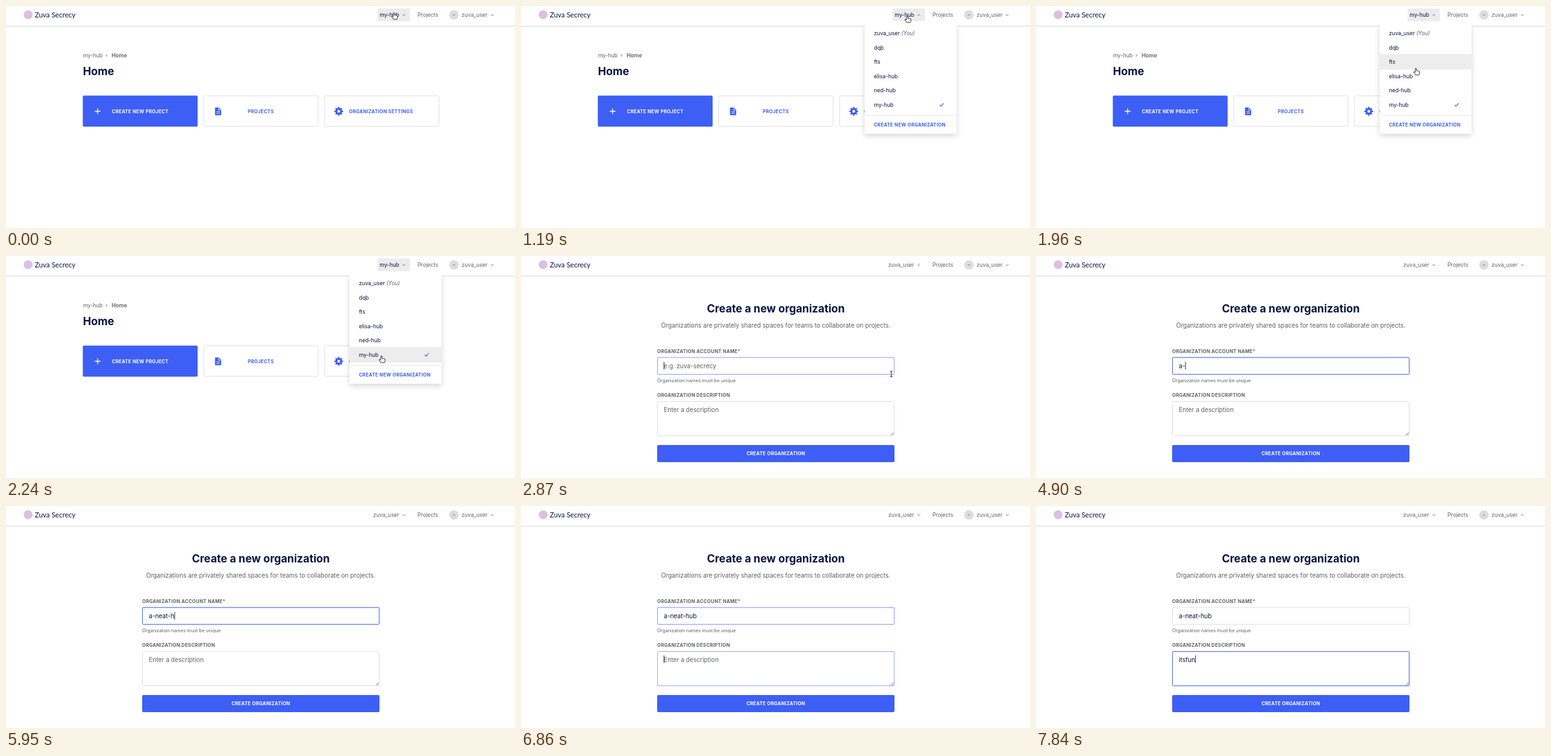
An HTML page that plays this animation: 800x350 px, repeating every 8000 ms.

```html
<!DOCTYPE html>
<html lang="en">
<head>
<meta charset="utf-8">
<title>Create an organization</title>
<style>
  html, body { margin: 0; width: 100%; height: 100%; overflow: hidden; background: #fff; }
  svg { display: block; width: 800px; height: 350px; font: 8.49px Inter, sans-serif; --blue: #3d5ff5; --navy: #05143f; }
  text { fill: #5f6063; white-space: pre; }
  .brand { font: 11px Lato, sans-serif; }
  .brand, .dark, .item { fill: var(--navy); }
  .title { font-size: 17px; font-weight: 700; fill: var(--navy); }
  .body { font-size: 9.7px; }
  .typed { fill: #0b1533; }
  .small { font-size: 7.28px; }
  .label, .action { font-size: 7.28px; font-weight: 700; letter-spacing: .3px; }
  .action { fill: var(--blue); }
  .white { fill: #fff; }
  .mid { text-anchor: middle; }
  .end { text-anchor: end; }
  .solid { fill: var(--blue); }
  .line { fill: none; stroke: #6a6b70; stroke-width: .95; }
  .box { fill: #fff; stroke: #dfe0e6; }
  .focus { fill: none; stroke: #4a66e8; }
  .panel { filter: drop-shadow(0 3px 4px #0000002b); }
</style>
</head>
<body>
<svg viewBox="0 0 800 350">
  <defs>
    <path id="chevron" class="line" d="M-2-1L0 1L2-1"/>
  </defs>

  <g id="home">
    <text x="121" y="81">my-hub</text>
    <path class="line" d="M157 76.2L158.8 78L157 79.8"/>
    <text x="166" y="81" font-weight="600">Home</text>
    <text class="title" x="121" y="108.8">Home</text>

    <rect class="solid" x="120.7" y="141.2" width="180.5" height="49" rx="2"/>
    <path d="M139.5 166h9M144 161.5v9" stroke="#fff" stroke-width="1.3"/>
    <text class="action white mid" x="211" y="168.5">CREATE NEW PROJECT</text>

    <rect class="box" x="310.8" y="141.7" width="179.7" height="48" rx="2"/>
    <path class="solid" d="M329.5 160h5l3.7 3.7v7.6q0 1-1 1h-7.7q-1 0-1-1v-10.3q0-1 1-1z"/>
    <path d="M334.2 160.8v3.4h3.4M330.8 166.8h5.2M330.8 169.3h5.2" fill="none" stroke="#fff" stroke-width=".9"/>
    <text class="action mid" x="400.5" y="168.5">PROJECTS</text>

    <rect class="box" x="500.8" y="141.7" width="179.7" height="48" rx="2"/>
    <g fill="none" stroke="var(--blue)">
      <circle cx="523" cy="166" r="3.8" stroke-width="3.2"/>
      <circle cx="523" cy="166" r="5.9" stroke-width="2" pathLength="16" stroke-dasharray="1" stroke-dashoffset=".5"/>
    </g>
    <text class="action" x="539" y="168.5">ORGANIZATION SETTINGS</text>
  </g>

  <g id="form">
    <text class="title mid" x="400.5" y="89">Create a new organization</text>
    <text class="body mid" x="400.5" y="113.2">Organizations are privately shared spaces for teams to collaborate on projects.</text>

    <text class="label" x="214" y="153.2">ORGANIZATION ACCOUNT NAME*</text>
    <rect class="box" x="214.5" y="160" width="372" height="26.5" rx="1"/>
    <rect class="focus" id="nameFocus" x="214.5" y="160" width="372" height="26.5" rx="1"/>
    <text class="body" id="name" x="224.5" y="177"></text>
    <text class="small" x="214" y="198.7">Organization names must be unique</text>

    <text class="label" x="214" y="222.2">ORGANIZATION DESCRIPTION</text>
    <rect class="box" x="214.5" y="229.5" width="372" height="54" rx="1"/>
    <rect class="focus" id="aboutFocus" x="214.5" y="229.5" width="372" height="54" rx="1"/>
    <path class="line" d="M581.5 282.5l4-4M584 282.5l1.5-1.5"/>
    <text class="body" id="about" x="224.5" y="245.5"></text>

    <rect class="solid" x="214" y="298" width="373" height="27" rx="2"/>
    <text class="action white mid" x="400.5" y="314">CREATE ORGANIZATION</text>
    <path id="caret" d="M0-10V2" stroke="#111" stroke-width=".9"/>
  </g>

  <path d="M0 31.5h800" stroke="#e0e1e4"/>
  <path d="M0 32.5h800" stroke="#f3f3f5"/>

  <g id="menu">
    <rect class="panel" x="540" y="30" width="144.5" height="171.5" rx="2" fill="#fff"/>
    <rect id="hover" x="540" width="144.5" height="24.5" fill="#ededee"/>
    <g id="items"></g>
    <path d="M658 155.8l2 2l4.2-4.4" fill="none" stroke="var(--blue)" stroke-width="1.2"/>
    <path d="M540 172.5h144.5" stroke="#e6e7eb"/>
    <text class="action" x="554.7" y="190">CREATE NEW ORGANIZATION</text>
  </g>

  <rect width="800" height="31" fill="#fff"/>
  <circle cx="34.8" cy="13.8" r="7" fill="#dcbfe2"/>
  <text class="brand" x="45.3" y="17.8">Zuva Secrecy</text>
  <rect id="tab" x="584" y="4" width="51" height="20" rx="2" fill="#ececed"/>
  <text class="end" id="org" x="618" y="17.2"></text>
  <g id="arrow"><use href="#chevron"/></g>
  <text x="646.7" y="17.2">Projects</text>
  <circle cx="704" cy="14" r="7.5" fill="#dddddf"/>
  <text class="mid" x="704" y="15.3" font-size="3.6">zu</text>
  <text x="716" y="17.2">zuva_user</text>
  <use href="#chevron" x="764.3" y="14.2"/>

  <path id="hand" fill="#fff" stroke="#111" stroke-width=".85" stroke-linejoin="round"
    d="M-1 1Q0-.6 1 1V4.4Q2 3.6 2.8 4.6Q3.8 4 4.4 5Q5.6 4.6 5.8 6V8.4L4.8 11H-.6L-3.4 7Q-3.6 5.4-2.2 6L-1 7Z"/>
  <path id="beam" d="M580 181.5q2 0 2 1.5q0-1.5 2-1.5M582 183v6M580 190.5q2 0 2-1.5q0 1.5 2 1.5" fill="none" stroke="#111" stroke-width=".9"/>
</svg>

<script>
const LOOP = 8000, STEP = 70, OPEN = 560, SUBMIT = 2800, TAB = 6800, FADE = 140;
const ROW = 22.55, FIRST_ROW = 43;

const el = id => document.getElementById(id);
const clamp = v => Math.min(1, Math.max(0, v));
const show = (id, on) => el(id).style.visibility = on ? 'visible' : 'hidden';
const move = (id, x, y, angle = 0) =>
  el(id).setAttribute('transform', `translate(${x} ${y}) rotate(${angle})`);

// Pointer stops: time, x, y
const stops = [
  [70, 609.5, 10], [420, 607, 15], [1610, 607, 15], [2240, 590, 157],
  [2380, 589, 159], [2450, 589, 159], [2660, 582, 186]
];

const fields = [
  { id: 'name', hint: 'e.g. zuva-secrecy', text: 'a-neat-hub', start: SUBMIT, end: TAB, y: 177,
    keys: [4200, 4550, 5040, 5250, 5390, 5530, 5740, 5880, 6020, 6160] },
  { id: 'about', hint: 'Enter a description', text: 'itsfun', start: TAB, end: Infinity, y: 245.5,
    keys: [7210, 7350, 7490, 7630, 7700, 7840] }
];

const rows = ['zuva_user', 'dqb', 'fts', 'elisa-hub', 'ned-hub', 'my-hub'];
el('items').innerHTML = rows.map((name, i) =>
  `<text class="item" x="554.7" y="${FIRST_ROW + i * ROW + 3}">${name}` +
  (i ? '' : '<tspan font-style="italic" fill="#5f6063"> (You)</tspan>') + '</text>').join('');

function pointerAt(t) {
  const i = stops.findIndex(s => s[0] > t);
  if (i === 0) return stops[0].slice(1);
  if (i < 0) return stops[stops.length - 1].slice(1);
  const [t0, x0, y0] = stops[i - 1], [t1, x1, y1] = stops[i];
  const k = (t - t0) / (t1 - t0), e = k * k * (3 - 2 * k);
  return [x0 + (x1 - x0) * e, y0 + (y1 - y0) * e];
}

function drawField(f, t) {
  const count = f.keys.filter(k => k <= t).length;
  const text = el(f.id);
  text.textContent = count ? f.text.slice(0, count) : f.hint;
  text.classList.toggle('typed', count > 0);
  el(f.id + 'Focus').style.opacity = clamp((t - f.start) / FADE) - clamp((t - f.end) / FADE);

  if (t < f.start || t >= f.end) return;
  const last = count ? f.keys[count - 1] : f.start;
  move('caret', 224.8 + (count ? text.getComputedTextLength() + .3 : 0), f.y);
  show('caret', (t - last) % 1060 < 530);
}

function drawMenu(t, y) {
  const opened = clamp((t - OPEN) / FADE) - clamp((t - SUBMIT) / FADE);
  move('arrow', 625.3, 14.2, 180 * opened);
  el('menu').style.display = t < SUBMIT && opened ? '' : 'none';
  el('menu').style.opacity = opened;

  const row = Math.floor((y - 32) / ROW);
  el('hover').style.display = row >= 0 && row < rows.length ? '' : 'none';
  el('hover').setAttribute('y', FIRST_ROW + row * ROW - 12.3);
}

function draw(t) {
  const home = t < SUBMIT;
  const [x, y] = pointerAt(t);

  el('home').style.display = home ? '' : 'none';
  el('form').style.display = home ? 'none' : '';
  show('tab', home);
  el('org').textContent = home ? 'my-hub' : 'zuva_user';
  el('org').classList.toggle('dark', home);

  drawMenu(t, y);
  if (!home) fields.forEach(f => drawField(f, t));

  move('hand', x, y);
  show('hand', home);
  show('beam', !home && t < fields[0].keys[0]);
}

// The picture advances in even steps, with a little slack at each edge.
const begin = performance.now();
function tick(now) {
  const t = Math.max(0, now - begin) % LOOP;
  draw(Math.floor((t + 8) / STEP) * STEP);
  requestAnimationFrame(tick);
}
draw(0);
requestAnimationFrame(tick);
</script>
</body>
</html>
```
